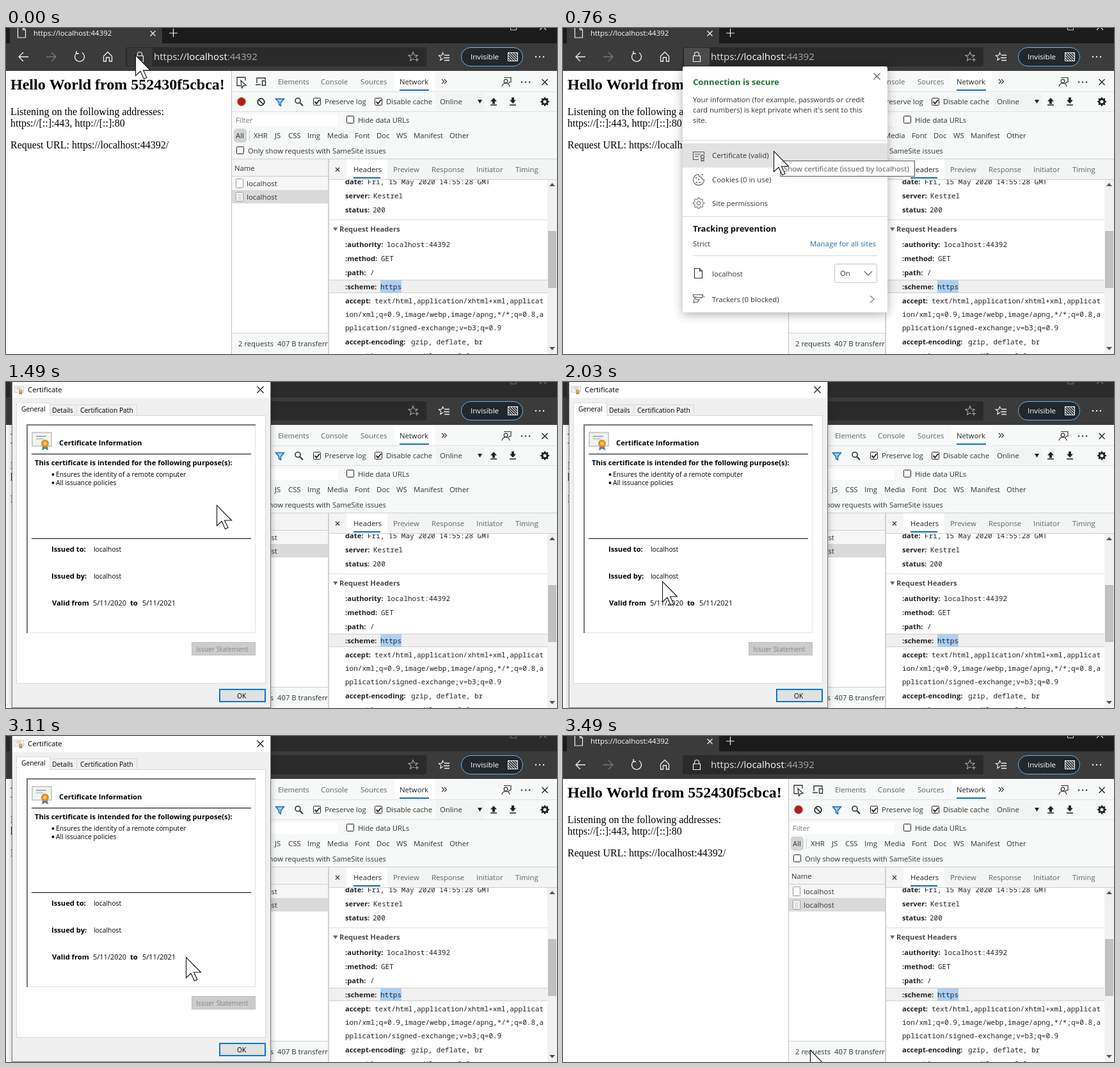
Recreate the animation shown at these times as an HTML page with a canvas. Size 861 by 509 pixels, loop 3550 ms.

```html
<!DOCTYPE html>
<html lang="en">
<head>
<meta charset="utf-8">
<title>Certificate check</title>
<style>
html, body { margin: 0; width: 100%; height: 100%; overflow: hidden; background: #fff; }
canvas { display: block; }
</style>
</head>
<body>
<canvas id="stage" width="861" height="509"></canvas>
<script>
const ctx = document.getElementById('stage').getContext('2d');
const LOOP = 3550;
const UI = '"Open Sans", "Noto Sans", sans-serif';
const SERIF = '"Liberation Serif", "Noto Serif", serif';
const MONO = '"Noto Sans Mono", "DejaVu Sans Mono", monospace';
const INK = '#333', GRAY = '#5f6368', LINE = '#cfcfcf', BLUE = '#0b6cbd';

// Pointer stops: time, x, y
const stops = [
  [0, 203, 42], [380, 212, 52], [440, 240, 86], [500, 282, 140], [560, 318, 180], [620, 330, 192],
  [1770, 318, 197], [1830, 282, 222], [1890, 235, 255], [1970, 182, 292], [2030, 156, 311],
  [2110, 147, 330], [2250, 145, 339], [2310, 147, 343],
  [2530, 180, 344], [2630, 238, 345], [2730, 270, 345], [2790, 282, 345],
  [3270, 300, 372], [3330, 345, 435], [3430, 387, 490]
];
const presses = [[60, 120], [1330, 1390], [2470, 3110], [3430, 3490]];

function box(x, y, w, h, fill) {
  ctx.fillStyle = fill;
  ctx.fillRect(x, y, w, h);
}

function frame(x, y, w, h, stroke, lw = 1) {
  ctx.strokeStyle = stroke;
  ctx.lineWidth = lw;
  ctx.strokeRect(x + lw / 2, y + lw / 2, w - lw, h - lw);
}

function round(x, y, w, h, r, fill, stroke) {
  ctx.beginPath();
  ctx.roundRect(x, y, w, h, r);
  if (fill) { ctx.fillStyle = fill; ctx.fill(); }
  if (stroke) { ctx.strokeStyle = stroke; ctx.lineWidth = 1; ctx.stroke(); }
}

function path(d, stroke, lw = 1, fill) {
  const p = new Path2D(d);
  if (fill) { ctx.fillStyle = fill; ctx.fill(p); }
  if (stroke) { ctx.strokeStyle = stroke; ctx.lineWidth = lw; ctx.stroke(p); }
}

function disc(x, y, r, fill, stroke, lw = 1) {
  ctx.beginPath();
  ctx.arc(x, y, r, 0, Math.PI * 2);
  if (fill) { ctx.fillStyle = fill; ctx.fill(); }
  if (stroke) { ctx.strokeStyle = stroke; ctx.lineWidth = lw; ctx.stroke(); }
}

// y is the middle of the capitals
function text(s, x, y, color = INK, size = 11.3, weight = 400, family = UI) {
  ctx.font = `${weight} ${size}px ${family}`;
  ctx.fillStyle = color;
  ctx.fillText(s, x, y + Math.round(size * 0.34));
}

function clipped(x, y, w, h, draw) {
  ctx.save();
  ctx.beginPath();
  ctx.rect(x, y, w, h);
  ctx.clip();
  draw();
  ctx.restore();
}

function cross(x, y, r, color, lw = 1.2) {
  path(`M${x - r} ${y - r}l${2 * r} ${2 * r}m0 ${-2 * r}l${-2 * r} ${2 * r}`, color, lw);
}

function dots(x, y, color) {
  for (let i = -1; i < 2; i++) disc(x + i * 6, y, 1.2, color);
}

function star(cx, cy, r, color) {
  ctx.beginPath();
  for (let i = 0; i < 10; i++) {
    const a = i * Math.PI / 5 - Math.PI / 2, q = i % 2 ? r * 0.45 : r;
    ctx.lineTo(cx + q * Math.cos(a), cy + q * Math.sin(a));
  }
  ctx.closePath();
  ctx.strokeStyle = color;
  ctx.lineWidth = 1.1;
  ctx.stroke();
}

function gear(cx, cy, r, color, solid) {
  ctx.beginPath();
  for (let i = 0; i < 32; i++) {
    const a = (i - 0.5) * Math.PI / 16, q = i % 4 < 2 ? r : r * 0.76;
    ctx.lineTo(cx + q * Math.cos(a), cy + q * Math.sin(a));
  }
  ctx.closePath();
  if (solid) {
    ctx.fillStyle = color;
    ctx.fill();
    disc(cx, cy, r * 0.36, '#f7f8f8');
  } else {
    ctx.strokeStyle = color;
    ctx.lineWidth = 1;
    ctx.stroke();
    disc(cx, cy, r * 0.34, null, color);
  }
}

function sheet(x, y, w, h, color, fold, lw = 1.2) {
  path(`M${x} ${y}h${w - fold}l${fold} ${fold}v${h - fold}h${-w}zM${x + w - fold} ${y}v${fold}h${fold}`, color, lw);
}

function check(x, y, on) {
  round(x + 0.5, y + 0.5, 11, 11, 1, '#fff', '#222');
  if (on) path(`M${x + 2.5} ${y + 6}l2.7 3l5-6`, '#222', 1.9);
}

function drawBrowser(lock, inactive) {
  const bar = '#3b3b3b', icon = '#f2f2f2', dim = inactive ? '#777' : '#ddd';
  box(0, 0, 861, 24, inactive ? '#2b2b2b' : '#1b1b1b');
  round(6, -6, 238, 40, 3, bar);
  box(0, 24, 861, 43, bar);
  sheet(18.5, -1, 12, 16, icon, 4);
  text('https://localhost:44392', 43, 8, '#fff', 11.4);
  cross(229.5, 8.5, 4, icon);
  path('M255 8h13M261.5 1v13', icon, 1.2);
  path('M788.5-5v8h9v-8', dim);
  cross(839, -2, 5, dim);

  path('M35 45H20M27 38l-7 7l7 7', icon, 1.3);
  path('M63 45h15M71 38l7 7l-7 7', '#777', 1.3);
  path('M111 38.5A7.5 7.5 0 1 0 119 38.5M110 36v4h4', icon, 1.4);
  path('M152.5 44l6.5-6.5l6.5 6.5v8h-4v-6h-5v6h-4z', icon, 1.3);
  round(187, 30, 470, 30, 3, '#2a2a2a');
  if (lock === 'hover') round(189, 31, 40, 28, 2, '#383838');
  if (lock === 'open') round(189, 31, 40, 28, 2, '#4b4b4b');
  path('M203.5 43.5h11v9h-11zM205.5 43v-2a3.5 3.5 0 0 1 7 0v2', icon, 1.2);
  text('https://', 231, 45, '#e4e4e4', 15.1);
  const schemeWidth = ctx.measureText('https://').width;
  text('localhost', 231 + schemeWidth, 45, '#fff', 15.1);
  text(':44392', 231 + schemeWidth + ctx.measureText('localhost').width, 45, '#a6a6a6', 15.1);

  star(636, 45, 7.5, '#aaa');
  box(638, 46, 8, 8, '#2a2a2a');
  path('M639 49.5h6M642 46.5v6', '#aaa', 1.2);
  star(682.5, 45, 6.5, icon);
  box(683, 42, 11, 11, bar);
  path('M685 42.5h8M684 46.5h9M685 50.5h8', icon, 1.3);
  round(711.5, 30.5, 96, 29, 14.5, '#22272c', '#68b5ec');
  text('Invisible', 726, 45, '#fff', 11.6);
  frame(784, 38, 16, 14, icon);
  clipped(785, 39, 14, 12, () => {
    for (let x = 776; x < 800; x += 4) path(`M${x} 38l14 14`, icon, 1.1);
  });
  dots(834, 45, icon);
}

function drawPage() {
  box(0, 67, 352, 442, '#fff');
  text('Hello World from 552430f5cbca!', 7, 88, '#000', 24, 700, SERIF);
  text('Listening on the following addresses:', 7, 131, '#000', 16, 400, SERIF);
  text('https://[::]:443, http://[::]:80', 7, 149, '#000', 16, 400, SERIF);
  text('Request URL: https://localhost:44392/', 7, 183, '#000', 16, 400, SERIF);
}

function drawToolbars() {
  box(352, 67, 509, 138, '#f7f8f8');
  box(607, 67, 63, 33, '#fff');
  box(352, 99, 509, 1, '#e0e0e0');
  box(352, 130, 509, 1, '#e0e0e0');
  path('M374 82v-5h-13v13h6M367 82l8 7.5l-4 .5l-2.5 3.5z', INK, 1.3);
  path('M392 86v-8h13v3M390 88.5h8M400.5 82.5h5v7h-5z', INK, 1.4);
  [['Elements', 425], ['Console', 492], ['Sources', 554], ['Network', 615]]
    .forEach(([s, x]) => text(s, x, 84, s === 'Network' ? '#222' : GRAY));
  box(615, 96, 46, 2, BLUE);
  path('M681 80l3.5 3.5l-3.5 3.5M685 80l3.5 3.5l-3.5 3.5', INK, 1.2);
  disc(781, 83, 2.8, null, INK, 1.2);
  path('M775 91.5c1-7 11-7 12 0M778 77.5h11v7h-2l-2 2', INK, 1.2);
  dots(812, 84.5, INK);
  cross(842, 84.5, 4.5, '#222', 1.4);

  disc(368, 115, 6.5, '#b01f17', '#d0796f');
  disc(398.5, 115.5, 5.3, null, '#222', 1.7);
  path('M395 112l7 7', '#222', 1.7);
  path('M421.5 110.5h13l-5 6v5l-3-1.5v-3.5z', BLUE, 1.4, '#9bd0f5');
  disc(456, 113.5, 4, null, INK, 1.6);
  path('M459 116.5l5 5', INK, 1.9);
  check(480, 109, true);
  text('Preserve log', 498, 115);
  check(576, 109, true);
  text('Disable cache', 594, 115);
  box(672, 102, 76, 26, '#f2f3f3');
  text('Online', 678, 115);
  path('M737 112h7l-3.5 6z', null, 1, '#222');
  path('M762 109l5 5.5h-3v4h-4v-4h-3zM757 119.5h10v1.5h-10z', null, 1, '#222');
  path('M792 118l5-5.5h-3v-4h-4v4h-3zM787 119.5h10v1.5h-10z', null, 1, '#222');
  gear(842, 115, 7, '#222', true);

  box(356, 135, 162, 18, '#fff');
  text('Filter', 359, 144, '#777');
  check(532, 137);
  text('Hide data URLs', 550, 144);
  round(356, 157, 20, 22, 5, '#d3d4d4');
  box(380, 160, 1, 16, LINE);
  [['All', 359], ['XHR', 387], ['JS', 420], ['CSS', 441], ['Img', 471], ['Media', 502], ['Font', 545],
    ['Doc', 579], ['WS', 610], ['Manifest', 637], ['Other', 693]].forEach(([s, x]) => text(s, x, 168));
  check(360, 185);
  text('Only show requests with SameSite issues', 378, 192);
}

function drawRequests() {
  box(352, 205, 152, 304, '#fff');
  box(352, 204, 509, 1, LINE);
  box(352, 205, 152, 26, '#f4f4f4');
  box(352, 231, 152, 1, LINE);
  text('Name', 357, 219);
  box(352, 232, 152, 21, '#f6f6f6');
  box(352, 253, 152, 21, '#dadada');
  [243, 264].forEach((y, i) => {
    round(359.5, y - 7.5, 11, 14, 1, '#fff', '#9a9a9a');
    if (i) for (let k = 0; k < 4; k++) box(362, y - 4 + k * 2.5, 6, 1, '#bbb');
    text('localhost', 376, y, INK, 11.4);
  });
  box(352, 476, 152, 1, LINE);
  box(352, 477, 152, 32, '#f7f8f8');
  clipped(352, 477, 151, 32, () => {
    text('2 requests', 363, 493);
    text('407 B transferred', 424, 493);
  });
  box(503, 205, 2, 304, '#d2d2d2');
  box(352, 67, 1, 442, '#c4c4c4');
}

function drawHeaders() {
  box(505, 205, 356, 31, '#f3f4f4');
  box(532, 205, 64, 31, '#fff');
  box(505, 236, 356, 1, LINE);
  cross(518, 221, 3, INK);
  [['Headers', 543], ['Preview', 605], ['Response', 665], ['Initiator', 735], ['Timing', 796]]
    .forEach(([s, x]) => text(s, x, 221, s === 'Headers' ? '#222' : GRAY));
  box(543, 233, 42, 2, BLUE);
  clipped(505, 237, 341, 272, () => {
    box(505, 237, 341, 272, '#fff');
    box(505, 299, 341, 1, '#dedede');
    path('M511 311.5h7.5l-3.75 5.5z', null, 1, '#666');
    text('Request Headers', 521, 314, '#4a4a4a', 11.2, 700);
    box(505, 393, 341, 21, '#f0f0f0');
    box(505, 393, 341, 1, LINE);
    box(505, 413, 341, 1, LINE);
    box(585, 394, 33, 19, '#abd0f5');
    [['date', 'Fri, 15 May 2020 14:55:28 GMT', 565, 240],
      ['server', 'Kestrel', 574, 262],
      ['status', '200', 573, 284],
      [':authority', 'localhost:44392', 595, 338],
      [':method', 'GET', 586, 360],
      [':path', '/', 569, 382],
      [':scheme', 'https', 585, 404],
      ['accept', 'text/html,application/xhtml+xml,applicat', 576, 426],
      ['', 'ion/xml;q=0.9,image/webp,image/apng,*/*;q=0.8,a', 530, 447],
      ['', 'pplication/signed-exchange;v=b3;q=0.9', 530, 468],
      ['accept-encoding', 'gzip, deflate, br', 633, 490],
      ['accept-language', 'en-US,en;q=0.9', 633, 512]
    ].forEach(([name, value, x, y]) => {
      if (name) text(name + ':', 530, y, '#222', 11.2, 700);
      text(value, x, y, '#222', 11, 400, MONO);
    });
  });
  box(846, 237, 15, 272, '#f1f1f1');
  box(847, 317, 13, 89, '#c1c1c1');
  path('M849 247h9l-4.5-5z', null, 1, '#555');
  path('M849 498h9l-4.5 5z', null, 1, '#555');
}

function drawPopup(row, tip) {
  ctx.save();
  ctx.shadowColor = 'rgba(0,0,0,.32)';
  ctx.shadowBlur = 16;
  ctx.shadowOffsetY = 3;
  round(187, 60, 320, 384, 3, '#fff');
  ctx.restore();
  text('Connection is secure', 203, 85, '#1a7433', 13.1, 700);
  cross(490.5, 75.5, 5, '#555', 1.1);
  ['Your information (for example, passwords or credit', "card numbers) is kept private when it's sent to this", 'site.']
    .forEach((s, i) => text(s, 203, 112 + i * 16));
  box(187, 175, 320, 1, '#d9d9d9');
  if (row) box(187, 180, 320, 38, row);
  const c = '#555';
  path('M212 205.5h-8.5v-12h17v4M206 197h9M206 200.5h6M216 203v5l2-1.3l2 1.3v-5', c, 1.1);
  disc(218, 201, 2.6, null, c, 1.1);
  text('Certificate (valid)', 233, 199, INK, 11.4);
  path('M212 228.5a8.5 8.5 0 1 0 8.5 8.5c-3 0-4-2-4-4c-3 0-4.5-2-4.5-4.5z', c, 1.1);
  [[208, 234], [209, 241], [214, 241], [212, 236.5], [218, 229]].forEach(([x, y]) => disc(x, y, 1.1, c));
  text('Cookies (0 in use)', 233, 237, INK, 11.4);
  gear(212, 273.5, 8.5, c);
  text('Site permissions', 233, 274, INK, 11.4);
  box(187, 294, 320, 1, '#d9d9d9');
  text('Tracking prevention', 203, 314, '#111', 13.1, 700);
  text('Strict', 203, 337);
  text('Manage for all sites', 386, 337, '#1d6fa5', 11.4);
  box(203, 355, 288, 1, '#d9d9d9');
  sheet(205.5, 375.5, 12, 15, '#333', 4);
  text('localhost', 233, 384, INK, 11.4);
  round(424.5, 368.5, 66, 29, 2, '#fff', '#c6c6c6');
  text('On', 433, 383);
  path('M471 380l6 6l6-6', c, 1.1);
  path('M203.5 416.5h15l-1.5 5l-13.5-2zM206 420v3l8 1.5M219 419l2 1M204.5 424v6M204.5 428h6l2-4', c, 1.2);
  text('Trackers (0 blocked)', 233, 424, INK, 11.4);
  path('M480 418l6 5.5l-6 5.5', '#777', 1.1);
  if (tip) {
    box(339, 207, 211, 25, '#fff');
    frame(339, 207, 211, 25, '#555');
    text('Show certificate (issued by localhost)', 345, 220, '#575757', 11.5);
  }
}

function certificate(x, y, k) {
  ctx.save();
  ctx.translate(x, y);
  ctx.scale(k, k);
  box(0, 0, 32, 23, '#c9ced2');
  box(2, 2, 28, 19, '#f3f3ee');
  box(7, 6, 16, 1.5, '#8d9aa5');
  box(7, 10, 12, 1.5, '#b6bfc6');
  path('M18 18l-2 11l5-3l5 3l-2-11z', null, 1, '#3f80c0');
  disc(21, 18, 6, '#e58a1f');
  disc(21, 18, 3, '#f8c35c');
  ctx.restore();
}

function drawDialog() {
  ctx.save();
  ctx.shadowColor = 'rgba(0,0,0,.3)';
  ctx.shadowBlur = 10;
  box(9, -2, 405, 515, '#777');
  ctx.restore();
  box(10, -2, 403, 510, '#f0f0f0');
  box(10, -2, 403, 27, '#fff');
  certificate(13, 6, 0.47);
  text('Certificate', 34, 12, '#000', 11.3);
  cross(397.5, 12, 5, '#111', 1.2);

  const edge = '#d9d9d9', small = 10.3, strong = 11.2;
  frame(68, 35, 43, 18, edge);
  frame(110, 35, 95, 18, edge);
  box(16, 52, 390, 419, '#fff');
  frame(16, 52, 390, 419, edge);
  box(16, 32, 53, 21, '#fff');
  path('M16.5 53v-20.5h52v20', edge);
  text('General', 24, 42, '#000', small);
  text('Details', 72, 44, '#000', small);
  text('Certification Path', 116, 44, '#000', small);

  frame(32, 66, 358, 326, '#e3e3e3');
  path('M33 392V67H390', '#777', 2);
  certificate(40, 78, 1);
  text('Certificate Information', 83, 95, '#000', strong, 700);
  box(40, 112, 343, 1, '#000');
  text('This certificate is intended for the following purpose(s):', 45, 126, '#000', strong, 700);
  ['Ensures the identity of a remote computer', 'All issuance policies'].forEach((s, i) => {
    disc(73.5, 144.5 + i * 13, 1.9, '#000');
    text(s, 78, 144 + i * 13, '#000', small);
  });
  box(40, 244, 343, 1, '#000');
  text('Issued to:', 71, 261, '#000', strong, 700);
  text('localhost', 137, 261, '#000', small);
  text('Issued by:', 71, 303, '#000', strong, 700);
  text('localhost', 137, 303, '#000', small);
  text('Valid from', 72, 345, '#000', strong, 700);
  text('5/11/2020', 136, 345, '#000', 11);
  text('to', 194, 345, '#000', strong, 700);
  text('5/11/2021', 213, 345, '#000', 11);

  box(290, 406, 100, 21, '#cccccc');
  frame(290, 406, 100, 21, '#bfbfbf');
  text('Issuer Statement', 297, 417, '#838383', small);
  box(333, 479, 73, 21, '#e1e1e1');
  frame(333, 479, 73, 21, '#0078d7', 2);
  text('OK', 361, 490, '#000', small);
}

// The press highlight lies over the pointer
function drawPointer(x, y, pressed) {
  path(`M${x - 0.5} ${y + 0.5}v32l7.5-7l5.5 12l4.5-2l-5.5-11.5h11z`, '#111', 1.1, '#fff');
  if (pressed) disc(x - 0.5, y, 24, 'rgba(255,242,0,.58)');
}

function draw(t) {
  const [, x, y] = stops.filter(s => s[0] <= t).pop();
  const pressed = presses.some(([a, b]) => t >= a && t < b);
  const popup = t >= 120 && t < 1390;
  const dialog = t >= 1490 && t < 3490;
  drawBrowser(t < 120 ? 'hover' : popup ? 'open' : '', dialog);
  drawPage();
  drawToolbars();
  drawRequests();
  drawHeaders();
  if (popup) {
    const row = pressed ? '#b9b9b9' : y >= 180 ? '#e2e2e2' : null;
    drawPopup(row, t >= 760 && t < 1330);
  }
  if (dialog) drawDialog();
  drawPointer(x, y, pressed);
}

const start = performance.now();
function tick() {
  draw((performance.now() - start) % LOOP);
  requestAnimationFrame(tick);
}
tick();
</script>
</body>
</html>
```
